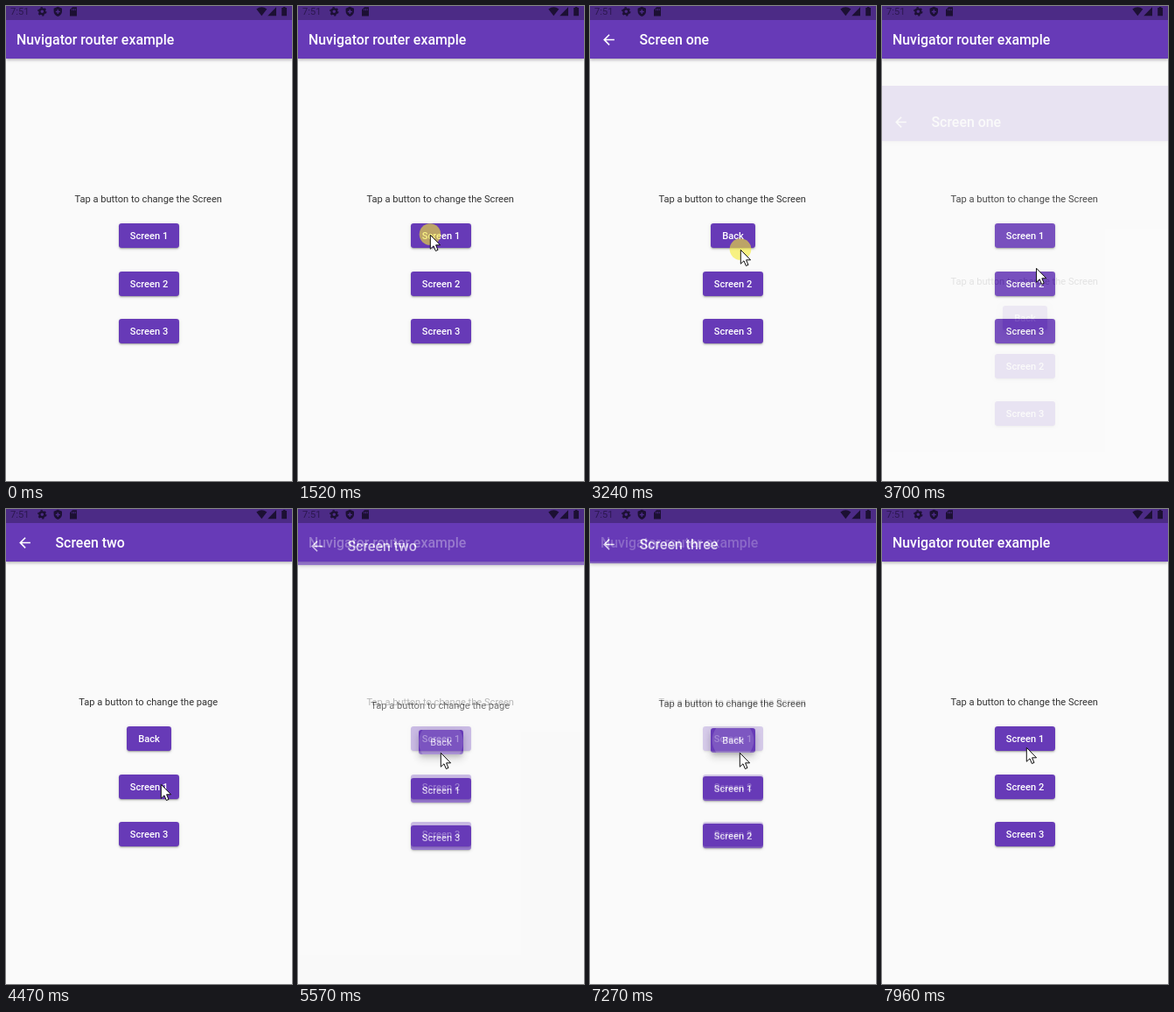
An HTML page that plays this animation: 327 px wide and 542 px high, repeating every 8000 ms.

```html
<!DOCTYPE html>
<html lang="en">
<head>
<meta charset="utf-8">
<title>Router example</title>
<style>
html, body { margin: 0; width: 100%; height: 100%; overflow: hidden; }
#stage { position: relative; width: 327px; height: 542px; overflow: hidden; background: #fafafa; font: 11.12px Roboto, sans-serif; }
#stage * { position: absolute; white-space: nowrap; }
.page { left: 0; top: -3px; width: 327px; height: 550px; background: #fafafa; }
.bar { left: 0; top: 0; width: 327px; height: 63px; background: #673ab7; box-shadow: 0 1px 3px #0003, 0 2px 4px #0002; }
.title { left: 12px; top: 20.4px; font-size: 15.9px; font-weight: 500; line-height: 44px; color: #fff; }
.hint { left: 0; top: 215.6px; width: 325.4px; line-height: 16px; text-align: center; color: #000c; }
.btn { height: 28.4px; line-height: 30px; border-radius: 3.2px; background: #673ab7; color: #fff; font-weight: 500; text-align: center;
  box-shadow: 0 2.4px .8px -1.6px #0003, 0 1.6px 1.6px #00000024, 0 .8px 4px #0000001f; }
.btn.down { box-shadow: 0 4px 4px -2px #0003, 0 6px 8px #00000024, 0 2px 10px #0000001f; }
svg { left: 0; top: 0; overflow: visible; }
</style>
</head>
<body>
<div id="stage">
  <svg id="overlay" width="327" height="542">
    <rect width="327" height="16" fill="#0004"/>
    <text x="5" y="10.3" fill="#2c1850">7:51</text>
    <g fill="#1c1033">
      <circle cx="41.3" cy="6.3" r="2.9" fill="none" stroke="#1c1033" stroke-width="2.2"/>
      <circle cx="41.3" cy="6.3" r="4.5" fill="none" stroke="#1c1033" stroke-width="1.4" stroke-dasharray="2.2 2.51"/>
      <path d="M59.3 .8L64 2.7V6Q64 10 59.3 12Q54.6 10 54.6 6V2.7Z"/>
      <path d="M59.3 4V9M56.8 6.5H61.8" stroke="#4d2b89" stroke-width="1.3"/>
      <path d="M76 1.3H81V11.4H73V4.3Z"/>
      <path d="M75.7 3.2V5.2M77.5 3.2V5.2M79.3 3.2V5.2" stroke="#4d2b89" stroke-width=".9"/>
      <path d="M286.3 3.6Q292.3 -1 298.3 3.6L292.3 11.2Z"/>
      <path d="M309 1.3V11.2H299.2Z"/>
      <path d="M316.8 1H319.4V2H321V11.3H315.2V2H316.8Z"/>
    </g>
    <g id="pointer">
      <circle id="press" cy="-.5" r="12.3" fill="#f5eb32" opacity=".6"/>
      <path d="M.3.3V16.2L4 12.8 6.4 18.5 9 17.4 6.6 11.8H11.6Z" fill="#fff" stroke="#111"/>
    </g>
  </svg>
</div>
<script>
const LOOP = 8000, ENTER = 520, STEP = 77.5;     // the picture updates once per STEP
const SLIDE = 136, FADE = 300, GLIDE = 300, PRESS = 2 * STEP;
const $ = id => document.getElementById(id);
const stage = $('stage'), overlay = $('overlay'), pointer = $('pointer'), press = $('press');

// where the pointer comes to rest: arrival time, x, y
const stops = [
  [ENTER, 256, 479], [950, 165, 300], [1290, 151, 261], [2130, 156, 263], [2850, 186, 337], [3230, 172, 278],
  [3690, 176, 294], [3900, 177, 314], [4770, 163, 278], [5870, 170, 380], [6940, 171, 278], [7570, 176, 346],
  [7960, 165, 272]];
const taps = [1525, 3230, 3925, 5245, 6098, 6950];

const clamp = v => Math.max(0, Math.min(1, v));
const mix = (a, b, k) => a + (b - a) * k;

function bezier(x1, y1, x2, y2) {
  const at = (a, b, s) => 3 * (1 - s) ** 2 * s * a + 3 * (1 - s) * s * s * b + s ** 3;
  return x => {
    let lo = 0, hi = 1;
    for (let i = 0; i < 24; i++) {
      const mid = (lo + hi) / 2;
      if (at(x1, x2, mid) < x) lo = mid; else hi = mid;
    }
    return at(y1, y2, (lo + hi) / 2);
  };
}
const slideEase = bezier(.4, 0, .2, 1), fadeEase = bezier(.42, 0, 1, 1);

function add(parent, cls, text = '') {
  const el = document.createElement('div');
  el.className = cls;
  el.textContent = text;
  parent.append(el);
  return el;
}

function makePage(title, noun, labels, push, pop) {
  const el = add(stage, 'page');
  add(el, 'bar');
  const heading = add(el, 'title', title);
  add(el, 'hint', `Tap a button to change the ${noun}`);
  const buttons = labels.map((label, i) => {
    const b = add(el, 'btn', label), w = label === 'Back' ? 51 : 69;
    b.style.cssText = `left:${163.5 - w / 2}px;top:${251 + i * 54.5}px;width:${w}px`;
    return b;
  });
  if (push) {
    heading.style.left = '56.5px';
    el.insertAdjacentHTML('beforeend', `<svg style="left:11.8px;top:31.8px" width="19.1" height="19.1" viewBox="0 0 24 24">
      <path fill="#fff" d="M20 11H7.83l5.59-5.59L12 4l-8 8 8 8 1.41-1.41L7.83 13H20v-2z"/></svg>`);
  }
  return { el, back: buttons[0], push, pop };
}

makePage('Nuvigator router example', 'Screen', ['Screen 1', 'Screen 2', 'Screen 3']);
const routes = [
  makePage('Screen one', 'Screen', ['Back', 'Screen 2', 'Screen 3'], 1798, 3481),
  makePage('Screen two', 'page', ['Back', 'Screen 1', 'Screen 3'], 4141, 5493),
  makePage('Screen three', 'Screen', ['Back', 'Screen 1', 'Screen 2'], 6262, 7216)];
stage.append(overlay);

function drawRoute({ el, back, push, pop }, t) {
  const v = clamp(Math.min(t - push, pop + FADE - t) / FADE);
  el.style.visibility = v > 0 ? 'visible' : 'hidden';
  el.style.opacity = fadeEase(v);
  el.style.transform = v < 1 ? `translateY(${SLIDE * (1 - slideEase(v))}px)` : 'none';
  const held = t - pop + 100, r = 10 + held * .09;
  back.classList.toggle('down', held > 0);
  back.style.backgroundImage = held > 0 ? `radial-gradient(circle, #fff3 ${r}px, #fff0 ${r + 1}px)` : 'none';
}

function drawPointer(t) {
  pointer.style.display = t < ENTER ? 'none' : '';
  if (t < ENTER) return;
  const next = stops.findIndex(s => s[0] >= t), i = next < 0 ? stops.length - 1 : next;
  const [arrive, x, y] = stops[i], [, x0, y0] = stops[Math.max(0, i - 1)];
  const u = clamp(1 - (arrive - t) / GLIDE), k = u * u * (3 - 2 * u);
  pointer.setAttribute('transform', `translate(${mix(x0, x, k)} ${mix(y0, y, k)})`);
  press.style.display = taps.some(tap => t >= tap && t < tap + PRESS) ? '' : 'none';
}

const snap = t => ENTER + STEP * Math.floor((t - ENTER) / STEP + .24);

const start = performance.now();
function tick() {
  const t = snap((performance.now() - start) % LOOP);
  routes.forEach(route => drawRoute(route, t));
  drawPointer(t);
  requestAnimationFrame(tick);
}
tick();
</script>
</body>
</html>
```
